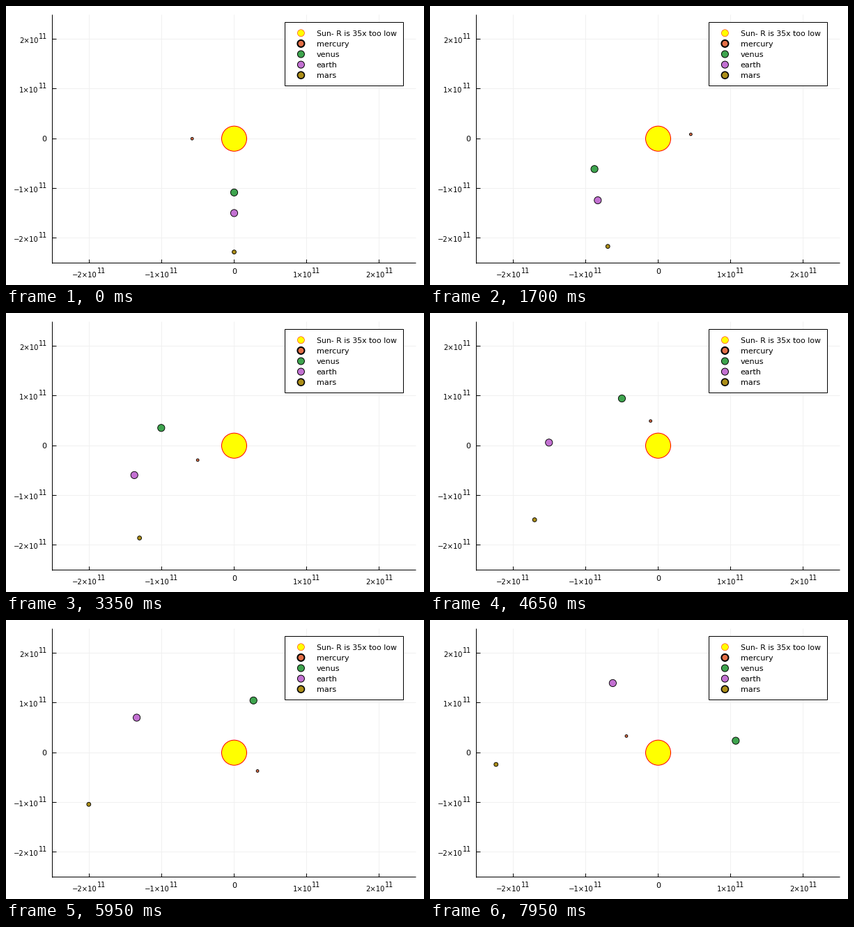
Recreate the animation shown at these times as a matplotlib script. Size 600 by 400 pixels, loop 8 s.

```python
import math
import numpy as np
import matplotlib.pyplot as plt
from matplotlib.animation import FuncAnimation
from matplotlib.patches import Circle, Rectangle

W, H, DPI = 600, 400, 100
FRAMES, INTERVAL = 160, 50
PX = 72 / DPI                      # one pixel in points

# Plot area: pixel place of the origin and pixels per 1e11 m
CX, CY = 327.5, 190.2
SX, SY = 104.2, 71.3
LEFT, RIGHT, TOP, BOTTOM = 66, 588, 12, 368

GM = 6.674e-11 * 1.989e30
DAY = 86400.0

# name, fill, radius px, legend edge px, start position (m), start velocity (m/s)
PLANETS = [
    ("mercury", "#e36f47", 1.9, 2.0, (-5.791e10, 0), (0, 45e3)),
    ("venus", "#3ea44e", 5.1, 1.0, (0, -1.082e11), (-35e3, 0)),
    ("earth", "#c371d2", 5.1, 1.0, (0, -1.496e11), (-30e3, 0)),
    ("mars", "#ac8e18", 2.9, 1.6, (0, -2.279e11), (-24e3, 0)),
]


def orbit(pos, vel):
    """One position per day, semi-implicit Euler steps."""
    pos, vel = np.array(pos, float), np.array(vel, float)
    path = []
    for _ in range(FRAMES):
        path.append(pos.copy())
        vel += -GM * pos / np.linalg.norm(pos) ** 3 * DAY
        pos += vel * DAY
    return np.array(path)


def to_px(p):
    return CX + p[0] / 1e11 * SX, CY - p[1] / 1e11 * SY


plt.rcParams["font.family"] = "DejaVu Sans"
fig = plt.figure(figsize=(W / DPI, H / DPI), dpi=DPI, facecolor="white")
ax = fig.add_axes([0, 0, 1, 1])
ax.set_xlim(0, W)
ax.set_ylim(H, 0)
ax.axis("off")


def line(x0, y0, x1, y1, color="black", z=1):
    """Line through whole pixels, named by their top left corner."""
    ax.plot([math.floor(x0), math.floor(x1)], [math.floor(y0), math.floor(y1)],
            color=color, lw=PX, zorder=z, solid_capstyle="butt")


def text(x, y, s, size=8.0, ha="left", z=2):
    ax.text(x, y, s, fontsize=size, ha=ha, va="baseline", zorder=z)


def disc(x, y, r, fill, edge="black", lw=1.0, z=3):
    return ax.add_patch(Circle((x, y), r, facecolor=fill, edgecolor=edge,
                               linewidth=lw * PX, zorder=z))


def power_label(k, join, base):
    """k x 10^11, with the exponent starting at x = join."""
    sign = "\u2212" if k < 0 else ""
    text(join, base, f"{sign}{abs(k)}\u00d710", 7.2, "right")
    text(join, base - 6, "11", 6.9)


# Grid, ticks and tick labels
for k in range(-2, 3):
    x, y = CX + k * SX, CY - k * SY
    line(x, TOP, x, BOTTOM, "#f0f0f0", 0)
    line(LEFT, y, RIGHT, y, "#f0f0f0", 0)
    line(x, BOTTOM, x, BOTTOM - 5)
    line(LEFT, y, LEFT + 6, y)
    if k == 0:
        text(x, 383.5, "0", ha="center")
        text(58.5, y + 4, "0", ha="right")
    else:
        width = 46 if k < 0 else 38
        power_label(k, x + width / 2 - 11.3, 389)
        power_label(k, 46.6, math.floor(y) + 6)

line(LEFT, TOP, LEFT, BOTTOM + 1)
line(LEFT, BOTTOM, RIGHT, BOTTOM)

# Bodies
disc(CX, CY, 18, "yellow", "red")
bodies = [disc(0, 0, r, fill, lw=0.9, z=4 + i)
          for i, (_, fill, r, *_rest) in enumerate(PLANETS)]
paths = [orbit(p[4], p[5]) for p in PLANETS]

# Legend
ax.add_patch(Rectangle((400, 23), 170, 91, facecolor="white",
                       edgecolor="black", linewidth=PX, zorder=10))
rows = [("Sun- R is 35x too low", "yellow", "red", 0.5, 7.85)]
rows += [(p[0], p[1], "black", p[3], 8.0) for p in PLANETS]
for i, (name, fill, edge, lw, size) in enumerate(rows):
    y = 38.8 + 15.1 * i
    disc(423.4, y, 5.0, fill, edge, lw, 11)
    text(445.6, y + 4, name, size, z=11)


def update(n):
    for body, path in zip(bodies, paths):
        body.center = to_px(path[n])
    return bodies


anim = FuncAnimation(fig, update, frames=FRAMES, interval=INTERVAL,
                     init_func=lambda: update(0), repeat=True,
                     repeat_delay=0, blit=False)
plt.show()
```
